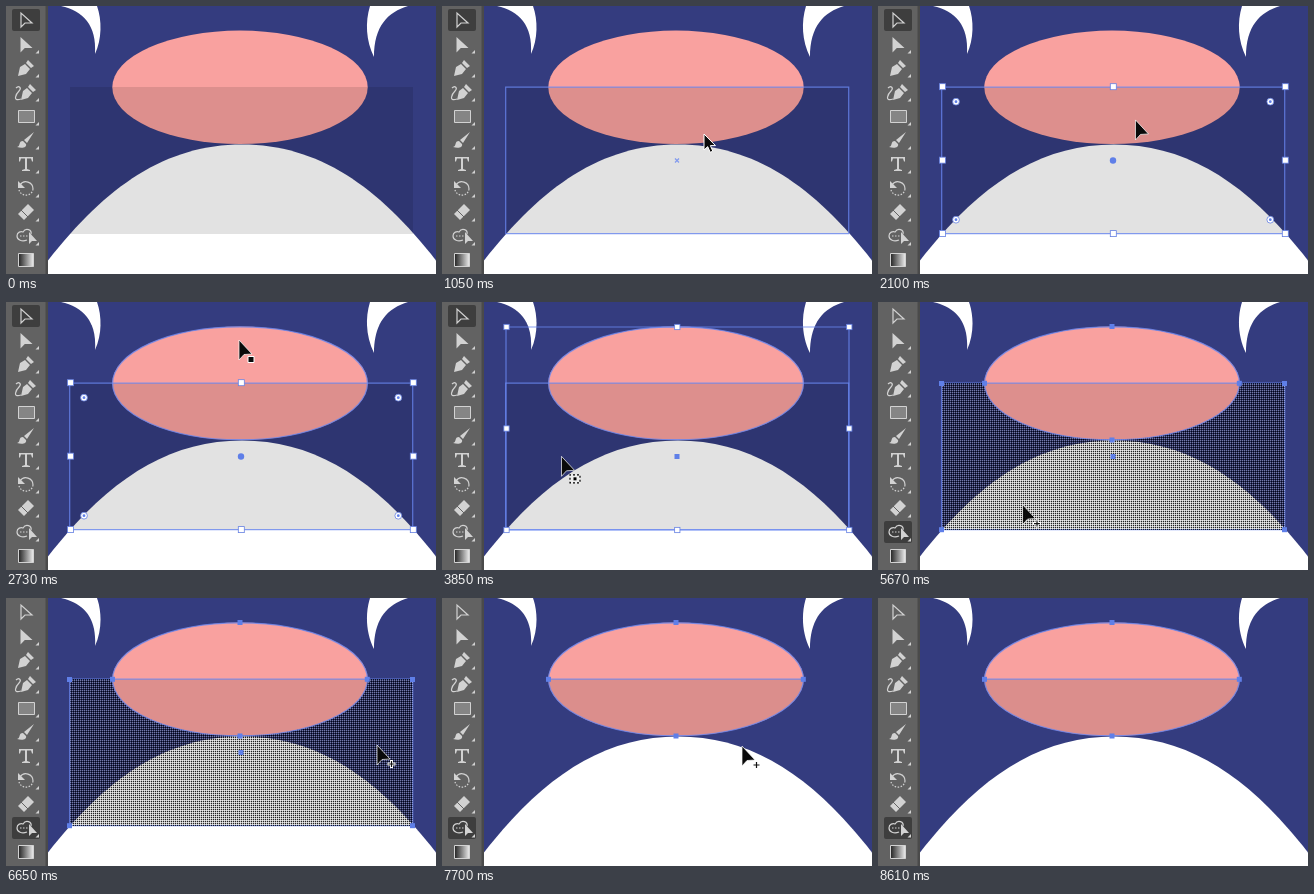
Write an HTML page that moves like this. It is 430 by 268 pixels and loops after 8680 ms.

```html
<!DOCTYPE html>
<html lang="en">
<head>
<meta charset="utf-8">
<title>Shape builder demo</title>
<style>
  html, body { margin: 0; width: 100%; height: 100%; overflow: hidden; }
  svg { display: block; width: 430px; height: 268px; }
  .line { fill: none; stroke: #6a88f0; stroke-width: 1.2; stroke-opacity: .8; }
  .icon { fill: none; stroke: #d2d2d2; stroke-width: 1.2; }
  .solid { fill: #d2d2d2; }
  .handle { fill: #fff; stroke: #6580e2; stroke-width: .8; }
  .anchor { fill: #5f7fe8; }
  .pointer { fill: #0a0a0a; stroke: #fff; stroke-width: 1; }
</style>
</head>
<body>
<svg viewBox="0 0 430 268">
  <defs>
    <pattern id="dots" x="1" y="1" width="2" height="2" patternUnits="userSpaceOnUse">
      <path d="M0 0H1V1H0Z" fill-opacity=".85"/>
      <path d="M1 0H2V1H1ZM0 1H1V2H0Z" fill-opacity=".17"/>
      <path d="M1 1H2V2H1Z" fill="#fff" fill-opacity=".35"/>
    </pattern>
    <linearGradient id="fade"><stop stop-color="#222"/><stop offset="1" stop-color="#eee"/></linearGradient>
  </defs>

  <rect width="430" height="268" fill="#343c7f"/>
  <path d="M55 0C77 5 91 19 89 48C96 33 96 14 91 0Z" fill="#fff"/>
  <path d="M402 0C382 6 368 20 368 51C360 35 359 16 364 0Z" fill="#fff"/>
  <path d="M42 254.500C100 180 160 138.500 236 138.500S372 180 430 254.500V268H42Z" fill="#fff"/>
  <ellipse cx="234" cy="81.300" rx="127.700" ry="56.700" fill="#f9a19f"/>
  <path id="shade" d="M64 81H407V228H64Z" fill-opacity=".114"/>
  <path id="cutShade" d="M106.300 81A127.700 56.700 0 0 0 361.700 81Z" fill-opacity=".12"/>

  <path id="rectLine" class="line" d="M63.700 81.200H406.700V227.600H63.700Z"/>
  <path id="mesh" d="M64 81H106.300A127.700 56.700 0 0 0 361.700 81H407V228H64Z" fill="url(#dots)"/>
  <ellipse id="ovalLine" class="line" cx="234" cy="81.300" rx="127.400" ry="56.400"/>
  <path id="splitLine" class="line" d="M106 81.200H362"/>
  <path id="hoverCenter" class="line" d="M233 152.500l4 4m0-4l-4 4"/>
  <g id="rectBox"></g>
  <g id="groupBox"><path class="line" d="M64 25H407V228H64Z"/></g>
  <g id="rectAnchors"></g>
  <g id="ovalAnchors"></g>

  <path d="M0 0H42V268H0Z" fill="#4a4a4a"/>
  <path d="M0 0H39.500V268H0Z" fill="#626262"/>
  <rect id="selectActive" x="6" y="3" width="28" height="22" rx="2" fill="#3e3e3e"/>
  <rect id="builderActive" x="6" y="219" width="28" height="22" rx="2" fill="#3e3e3e"/>
  <g id="tools">
    <path class="icon" d="M15 7V21L19 17H26Z"/>
    <path class="solid" d="M14.500 31V46.500L18.800 42H26.500Z"/>
    <path class="solid" d="M12 70L14 61L19 58L24 63L20 68ZM20 57L22 54L28 60L25 62Z"/>
    <path class="solid" d="M15 94L17 85L21 82L26 87L22 92ZM22 81L24 78L30 84L27 86Z"/>
    <path class="icon" d="M15 93C6 96 10 88 13 85S13 79 10 82"/>
    <path d="M12.500 104.500H28.500V116.500H12.500Z" fill="#858585" stroke="#d2d2d2"/>
    <path class="solid" d="M28 126L18 134L21 137ZM17 135C12 135 15 140 11 141C17 143 21 141 20 138Z"/>
    <path class="solid" d="M13 151H27V155.500H26L25 152.500H21V163L24 164V165H16V164L19 163V152.500H15L14 155.500H13Z"/>
    <path class="icon" d="M14 179C18 173 27 176 27 183"/>
    <path class="icon" stroke-dasharray="1.5 1.5" d="M27 183C26 191 15 191 13 184"/>
    <path class="solid" d="M12 175V182H19Z"/>
    <path class="solid" d="M12 208L22 198L28 204L18 214Z"/>
    <path d="M15 204L22 211" stroke="#626262"/>
    <path class="icon" d="M21 234C16 236 11 234 11 230C11 226 15 225 17 226C20 221 26 224 25 228"/>
    <path class="icon" stroke-dasharray="1.5 1.5" d="M14 230H22"/>
    <path class="solid" d="M23 226V238L26 235H31Z"/>
    <path d="M12.500 247.500H27.500V260.500H12.500Z" fill="url(#fade)" stroke="#d2d2d2"/>
  </g>

  <g id="tooltip">
    <path d="M32 249H198V268H32Z" fill="#c9c9c9"/>
    <text x="39" y="263" font-family="Inter, Roboto, sans-serif" font-size="11" fill="#444">Shape Builder Tool (Shift+M)</text>
  </g>

  <g id="cursor">
    <path id="plainArrow" class="pointer" d="M0 0V16L3.700 12.600L6.200 18.300L8.800 17.200L6.400 11.600H11.500Z"/>
    <path id="headArrow" class="pointer" style="stroke-width:.7" d="M0 0V20L5 14.500L13 14Z"/>
    <path id="squareBadge" class="pointer" d="M9 16.500H15V22.500H9Z"/>
    <g id="dottedBadge">
      <path d="M8 18H19V27H8Z" fill="#eee"/>
      <path d="M8.500 18.500H18.500V26.500H8.500Z" fill="none" stroke="#000" stroke-width="1.200" stroke-dasharray="2 2" stroke-dashoffset="1"/>
      <path d="M12 21H15V24H12Z"/>
    </g>
    <g id="plusBadge" fill="none">
      <path d="M10.500 19H18.500M14.500 15V23" stroke="#fff" stroke-width="3"/>
      <path d="M11.500 19H17.500M14.500 16V22" stroke="#111" stroke-width="1.200"/>
    </g>
  </g>
</svg>
<script>
const LOOP = 8680, STEP = 70;
const $ = id => document.getElementById(id);
const add = (id, markup) => $(id).insertAdjacentHTML('beforeend', markup);
const square = (cls, size) => ([x, y]) =>
  `<rect class="${cls}" x="${x - size / 2}" y="${y - size / 2}" width="${size}" height="${size}"/>`;
const anchor = square('anchor', 5);

// Eight handles around a selection box.
function handles(top, bottom, size) {
  const middle = (top + bottom) / 2;
  return [64.5, 235.3, 407.3].flatMap(x => [top, middle, bottom].map(y => [x, y]))
    .filter(([x, y]) => x !== 235.3 || y !== middle).map(square('handle', size)).join('');
}
const cornerWidget = ([x, y]) =>
  `<circle class="handle" cx="${x}" cy="${y}" r="3.4"/><circle class="anchor" cx="${x}" cy="${y}" r="1.4"/>`;

add('rectBox', handles(80.7, 227.6, 6) + '<circle class="anchor" cx="235" cy="154.5" r="3.2"/>' +
  [[78, 95.7], [392.3, 95.7], [78, 213.7], [392.3, 213.7]].map(cornerWidget).join(''));
add('groupBox', handles(25, 228, 5.3) + anchor([235, 154.5]));
add('rectAnchors', [[63.5, 81.5], [406.5, 81.5], [63.5, 227.7], [406.5, 227.7], [235, 154.5]].map(anchor).join(''));
add('ovalAnchors', [[234, 24.5], [106.5, 81.3], [361.3, 81.3], [234, 138]].map(anchor).join(''));
for (const y of [38, 62, 86, 110, 134, 158, 182, 206, 230])
  add('tools', `<path class="solid" d="M33 ${y + 6}V${y + 9.5}H29.500Z"/>`);

const easeOut = k => 1 - (1 - k) ** 2.35;
const easeInOut = k => k * k * (3 - 2 * k);
const moves = [
  { start: 0, end: 700, x: 262, y: 128, ease: easeOut },
  { start: 1890, end: 2730, x: 233, y: 38, ease: easeInOut },
  { start: 3640, end: 4340, x: 33, y: 230, ease: easeOut, sag: 7.5 },
  { start: 5320, end: 6230, x: 371, y: 147, ease: easeInOut },
  { start: 6650, end: 7070, x: 300, y: 148, ease: easeInOut },
];

function cursorAt(t) {
  let x = 444, y = 178;
  for (const m of moves) {
    if (t < m.start) break;
    const k = m.ease(Math.min(1, (t - m.start) / (m.end - m.start)));
    x += (m.x - x) * k;
    y += (m.y - y) * k + 4 * k * (1 - k) * (m.sag || 0);
  }
  return [x, y];
}

const show = (id, on) => $(id).style.display = on ? '' : 'none';

function draw(t) {
  const [x, y] = cursorAt(t);
  const between = (a, b) => t >= a && t < b;
  const builder = t >= 5180, cut = t >= 7490;
  const rectSelected = between(1540, 3080), bothSelected = between(3080, 5180);
  const overOval = rectSelected && y < 81;
  const overRect = x > 64 && x < 407 && y > 81 && y < 228;

  show('shade', !cut);
  show('cutShade', cut);
  show('rectLine', t >= 980 && !cut);
  show('hoverCenter', between(980, 1540));
  show('ovalLine', overOval || t >= 3080);
  show('splitLine', cut);
  show('mesh', builder && !cut && overRect);
  show('rectBox', rectSelected);
  show('groupBox', bothSelected);
  show('rectAnchors', builder && !cut);
  show('ovalAnchors', builder);
  show('selectActive', !builder);
  show('builderActive', t >= 5040);
  show('tooltip', between(5040, 5250));

  const plain = t < 1540 || x < 42;
  show('plainArrow', plain);
  show('headArrow', !plain);
  show('squareBadge', overOval);
  show('dottedBadge', bothSelected && !plain);
  show('plusBadge', builder && !plain);
  $('cursor').setAttribute('transform', `translate(${x} ${y})`);
  $('cursor').style.opacity = Math.max(0, Math.min(1, (8330 - t) / 350));
}

function tick() {
  const t = performance.now() % LOOP;
  draw(Math.floor(t / STEP) * STEP);
  requestAnimationFrame(tick);
}
tick();
</script>
</body>
</html>
```
